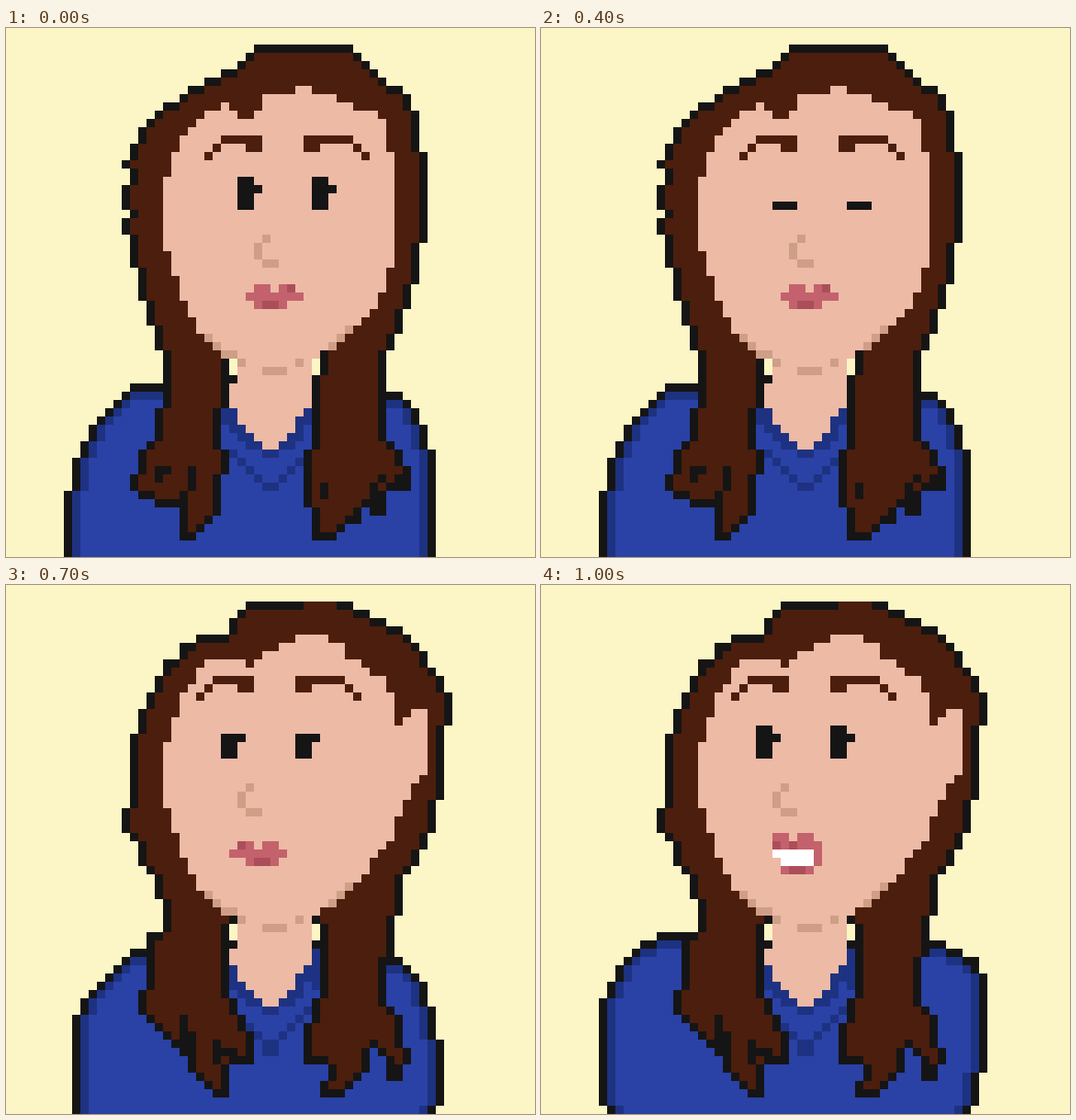
An HTML page with a canvas that plays this animation: 576 px wide and 576 px high, repeating every 1100 ms.

```html
<!DOCTYPE html>
<html lang="en">
<head>
<meta charset="utf-8">
<title>Pixel portrait</title>
<style>
html, body { margin: 0; height: 100%; overflow: hidden; background: #fcf5c5; }
canvas { display: block; width: 576px; height: 576px; }
</style>
</head>
<body>
<canvas width="576" height="576"></canvas>
<script>
const ctx = document.querySelector('canvas').getContext('2d');
const CELL = 9, LOOP = 1100;
const CREAM = '#fcf5c5', INK = '#151515', HAIR = '#4c1e0d', SKIN = '#edbaa5', SHADE = '#cf9e87',
  BLUE = '#2a41a6', NAVY = '#1e3282', LIP = '#c3626c', DARK_LIP = '#ac4e59', WHITE = '#fff';

// Outlines on a 64 x 64 grid
const shape = d => new Path2D(d);
const jaw = 'V35H43V36H42V37H41V38H40V39H38V40H26V39H25V38H24V37H23V35H22V33H21V30H20V27H19';
const neck = shape('M28 40H37V46H36V47H35V49H34V50H33V51H31V50H30V49H29V48H28V46H27V43H28Z');
const collar = shape('M26 46H37V48H36V50H35V51H33V52H31V51H29V50H28V49H27V48H26ZM37 44h1v5h-1Z');

const bodies = {
  rest: shape('M15 43H27V42H38V44H48V45H49V46H50V48H51V51H52V67H7V56H8V52H9V50H10V48H11V47H12V46H13V45H14V44H15Z'),
  low: shape('M15 44H27V43H38V45H48V46H49V47H50V48H51V51H52V55H53V63H52V67H8V52H9V50H10V49H11V48H12V47H13V46H14V45H15Z'),
  high: shape('M14 42H27V43H49V44H51V45H53V47H54V59H53V63H52V67H8V63H7V50H8V48H9V46H10V45H11V44H12V43H14Z')
};

const front = {
  hair: shape('M30 2H42V3H43V4H44V5H45V6H46V7H48V8H49V10H50V15H51V26H50V31H49V34H48V37H47V39H46' +
    'V50H47V51H48V53H49V56H46V59H44V58H43V60H41V61H40V62H37V58H36V51H37V42H38V39H27V46H26V51H27V54H26' +
    'V59H25V60H24V61H23V62H21V58H18V57H16V56H15V54H16V51H17V50H18V46H19V39H18V36H17V33H16V29H15' +
    'V25H14V23H15V22H14V19H15V17H14V16H15V14H16V12H17V11H18V10H19V9H21V8H22V7H24V6H26V5H28V4H29V3H30Z'),
  face: shape('M35 7H37V8H40V9H42V10H45V11H46V15H47V29H46V32H45V34H44' + jaw +
    'V18H20V15H21V13H22V12H23V11H24V10H26V9H27V10H28V11H30V10H31V8H35Z'),
  strands: [[18, 53, 2, 1], [18, 54, 1, 1], [22, 53, 1, 3], [21, 56, 1, 2],
    [38, 55, 1, 2], [44, 55, 1, 3], [45, 54, 1, 1], [47, 54, 1, 1]]
};

const turned = {
  hair: shape('M29 2H42V3H44V4H46V5H48V6H49V7H50V8H51V10H52V11H53V13H54V17H53V26H52V30H51V32H50V34H49V35H48' +
    'V40H47V45H46V51H47V52H48V56H49V58H48V60H46V57H45V56H44V59H43V60H42V61H41V62H38V60H39V58H36V53H37' +
    'V50H38V41H27V50H28V52H29V54H30V58H27V62H25V61H24V60H23V59H22V57H21V56H20V55H19V54H18V53H17V52H16' +
    'V49H17V42H19V38H18V35H17V34H16V31H15V30H14V27H15V18H16V15H17V13H18V11H19V9H21V7H23V6H27V4H28V3H29Z'),
  face: shape('M35 6H39V7H41V9H43V10H44V11H46V13H47V17H48V16H49V15H51V23H50V24H49V26H48V28H47V31H46V32H45V33H44' + jaw +
    'V19H20V16H21V13H22V12H23V10H24V9H29V10H30V9H31V8H33V7H35Z'),
  strands: [[21, 52, 1, 4], [22, 54, 1, 3], [25, 55, 1, 3], [26, 56, 2, 1]]
};

// inset trims that many cells off the edge
function paint(path, color, inset = 0) {
  ctx.save();
  for (let dx = -inset; dx <= inset; dx++) {
    const rest = inset - Math.abs(dx);
    for (const dy of rest ? [-rest, rest] : [0]) {
      ctx.translate(dx, dy);
      ctx.clip(path);
      ctx.translate(-dx, -dy);
    }
  }
  ctx.fillStyle = color;
  ctx.fill(path);
  ctx.restore();
}

function rects(color, list, dx = 0, dy = 0) {
  ctx.fillStyle = color;
  for (const [x, y, w, h] of list) ctx.fillRect(x + dx, y + dy, w, h);
}

function drawBody(body, isTurned) {
  [INK, NAVY, BLUE].forEach((color, i) => paint(body, color, i));
  paint(collar, NAVY);
  for (let i = 0; i < 5; i++) rects(NAVY, [[27 + i, 51 + i, 1, 1], [36 - i, 51 + i, 1, 1]]);
  if (isTurned) rects(NAVY, [[31, 56, 2, 1]]);
}

function drawHead(pose, isTurned) {
  paint(pose.hair, INK);
  paint(pose.hair, HAIR, 1);
  rects(INK, pose.strands);
  if (isTurned) rects(HAIR, [[36, 2, 4, 1]]);
  paint(neck, SKIN);
  if (isTurned) rects(INK, [[27, 43, 1, 1]]);
  paint(pose.face, SKIN);
  rects(SHADE, [[24, 37, 1, 1], [25, 38, 1, 1], [26, 39, 2, 1], [28, 40, 1, 1], [35, 40, 1, 1],
    [31, 41, 3, 1], [41, 36, 1, 1], [40, 37, 1, 1], [39, 38, 1, 1]]);
}

function drawEyes(x, y, lid) {
  for (const ex of [x, x + 9]) {
    rects(INK, lid === 'happy'
      ? [[0, -1, 2, 1], [-1, 0, 4, 1], [-1, 1, 1, 1], [3, 1, 1, 1]]
      : [[0, lid, 2, 4 - lid], [2, Math.max(1, lid), 1, 1]], ex, y);
  }
}

function drawMouth(isTurned, smile) {
  if (smile) {
    rects(LIP, [[28, 30, 2, 1], [31, 30, 2, 1], [28, 31, 6, 1], [33, 32, 1, 2], [29, 34, 4, 1]]);
    rects(DARK_LIP, [[28, 31, 1, 1], [30, 31, 1, 1], [30, 34, 2, 1]]);
    rects(WHITE, [[28, 32, 5, 1], [29, 33, 4, 1]]);
    return;
  }
  const x = isTurned ? 27 : 29;
  rects(LIP, [[1, 31, 2, 1], [4, 31, 2, 1], [0, 32, 7, 1], [isTurned ? 2 : 1, 33, 4, 1]], x);
  rects(DARK_LIP, [[isTurned ? 1 : 5, 31, 1, 1], [isTurned ? 3 : 2, 33, 2, 1]], x);
}

const steps = [
  { at: 0, body: 'rest', lid: 0 },
  { at: 200, body: 'rest', lid: 1 },
  { at: 300, body: 'rest', lid: 2 },
  { at: 400, body: 'rest', lid: 3 },
  { at: 500, body: 'rest', lid: 1 },
  { at: 600, body: 'low', lid: 0 },
  { at: 700, body: 'low', lid: 1 },
  { at: 800, body: 'high', lid: 'happy', smile: true },
  { at: 1000, body: 'high', lid: 0, smile: true }
];

function draw({ body, lid, smile }) {
  const isTurned = body !== 'rest';
  const [dx, dy] = isTurned ? [-2, -1] : [0, 0];
  ctx.setTransform(CELL, 0, 0, CELL, 0, 0);
  rects(CREAM, [[0, 0, 64, 64]]);
  drawBody(bodies[body], isTurned);
  drawHead(isTurned ? turned : front, isTurned);
  rects(HAIR, [[26, 13, 5, 1], [29, 14, 2, 1], [25, 14, 1, 1], [24, 15, 1, 1],
    [36, 13, 6, 1], [36, 14, 2, 1], [42, 14, 1, 1], [43, 15, 1, 1]], dx / 2, dy * 2);
  rects(SHADE, [[31, 25, 1, 1], [30, 26, 1, 2], [31, 28, 2, 1]], dx, dy);
  drawEyes(28 + dx, 18 + dy, lid);
  drawMouth(isTurned, smile);
}

function tick() {
  const t = performance.now() % LOOP;
  draw(steps.filter(s => s.at <= t).pop());
  requestAnimationFrame(tick);
}
tick();
</script>
</body>
</html>
```
